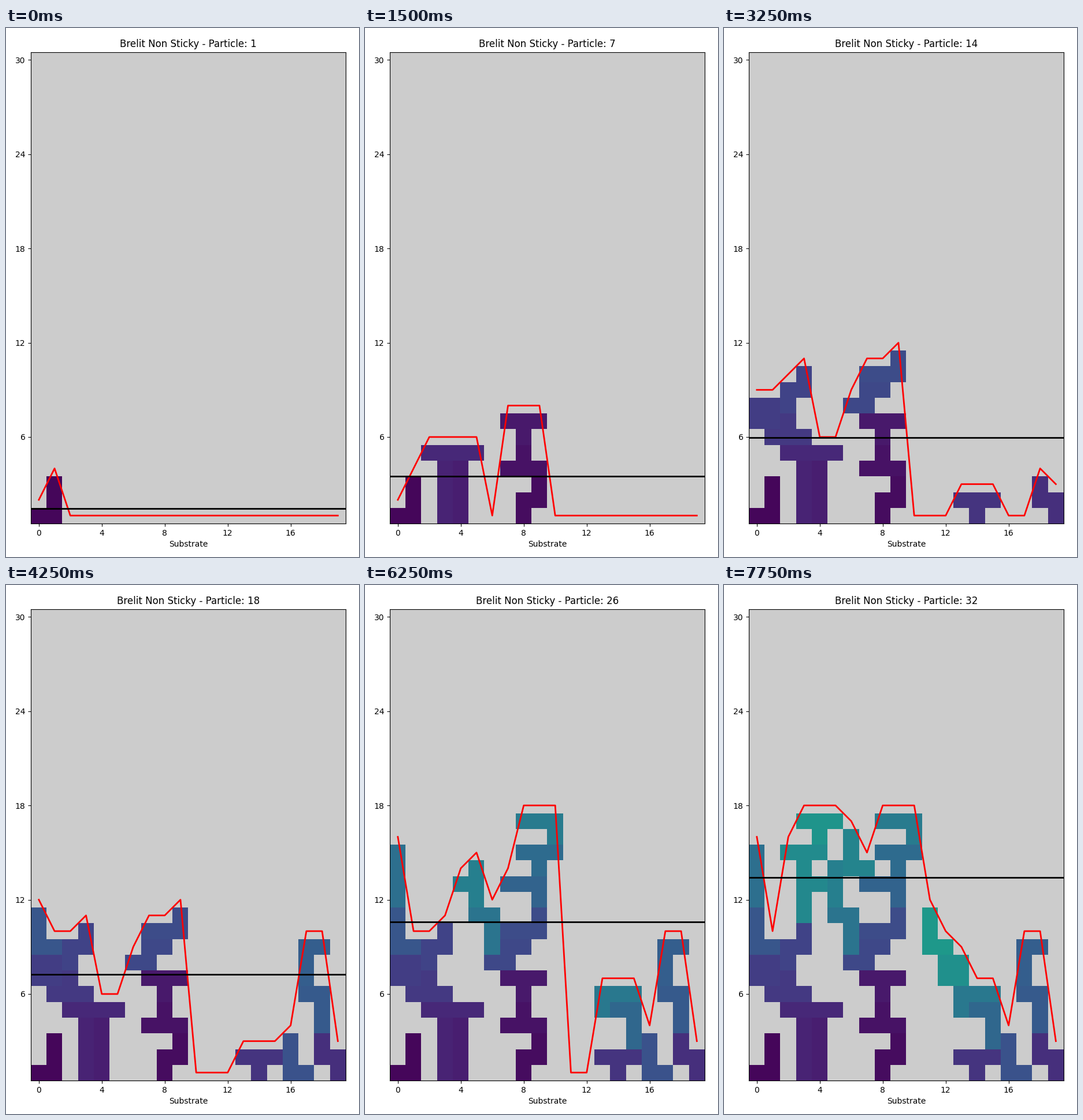
Write a matplotlib script that moves like this. It is 611x917 px and loops after 8000 ms.

```python
import numpy as np
import matplotlib.pyplot as plt
from matplotlib.animation import FuncAnimation

W, H, DPI = 611, 917, 100
COLS, ROWS = 20, 30
FRAMES, STEP_MS = 32, 250
COLOR_MAX = 60

plt.rcParams["font.family"] = "DejaVu Sans"

# Rows of each block, bottom row first.
SHAPES = {
    "O": "## ##",
    "I": "# # # #",
    "flatI": "####",
    "J": "## .# .#",
    "L": "## #. #.",
    "7": ".# .# ##",
    "F": "#. #. ##",
    "S": "##. .##",
    "tallS": "#. ## .#",
    "tallZ": ".# ## #.",
    "T": "### .#.",
    "downT": ".#. ###",
    "leftT": ".# ## .#",
    "flatL": "### ..#",
    "hookR": "..# ###",
    "hookL": "#.. ###",
}

# (shape, left column, bottom row) in order of landing; the last one
# only counts towards the mean height.
DROPS = [
    ("J", 0, 1), ("tallS", 8, 1), ("T", 7, 4), ("downT", 7, 6),
    ("I", 4, 1), ("I", 3, 1), ("flatI", 2, 5), ("tallZ", 18, 1),
    ("downT", 13, 1), ("T", 1, 6), ("O", 0, 7), ("tallS", 2, 8),
    ("S", 6, 8), ("flatL", 7, 10), ("L", 16, 1), ("L", 0, 9),
    ("7", 17, 4), ("F", 17, 7), ("hookR", 7, 12), ("7", 14, 3),
    ("downT", 8, 14), ("I", 0, 12), ("7", 5, 9), ("hookL", 13, 5),
    ("hookR", 8, 16), ("leftT", 4, 12), ("L", 6, 14), ("F", 3, 11),
    ("downT", 2, 14), ("O", 12, 7), ("downT", 3, 16), ("L", 11, 9),
    ("flatI", 11, 12),
]


def cells(shape, col, row):
    for dy, line in enumerate(SHAPES[shape].split()):
        for dx, mark in enumerate(line):
            if mark == "#":
                yield col + dx, row + dy


def stack(count):
    """Grid of particle numbers and the surface above each column."""
    grid = np.zeros((ROWS, COLS))
    surface = np.ones(COLS)
    for number, drop in enumerate(DROPS[:count], 1):
        for x, y in cells(*drop):
            grid[y - 1, x] = number
            surface[x] = max(surface[x], y + 1)
    return np.ma.masked_equal(grid, 0), surface


fig = plt.figure(figsize=(W / DPI, H / DPI), dpi=DPI, facecolor="white")
ax = fig.add_axes([43.2 / W, 58.2 / H, 544.8 / W, 817.2 / H])
ax.set_facecolor("0.8")

image = ax.imshow(stack(1)[0], cmap="viridis", vmin=0, vmax=COLOR_MAX,
                  origin="lower", interpolation="nearest", aspect="auto",
                  extent=(-0.5, COLS - 0.5, 0.5, ROWS + 0.5))
surface_line, = ax.plot(np.arange(COLS), np.ones(COLS), color="red", lw=2)
mean_line = ax.axhline(1, color="black", lw=2)

ax.set_xlim(-0.5, COLS - 0.5)
ax.set_ylim(0.5, ROWS + 0.5)
ax.set_xticks(range(0, COLS, 4))
ax.set_yticks(range(6, ROWS + 1, 6))
ax.set_xlabel("Substrate")
title = ax.set_title("")


def draw(frame):
    count = frame + 1
    grid, surface = stack(count)
    # The mean line runs one particle ahead of the picture.
    mean = stack(count + 1)[1].mean()
    image.set_data(grid)
    surface_line.set_ydata(surface)
    mean_line.set_ydata([mean, mean])
    title.set_text(f"Brelit Non Sticky - Particle: {count}")
    return image, surface_line, mean_line, title


anim = FuncAnimation(fig, draw, frames=FRAMES, interval=STEP_MS,
                     repeat=True, repeat_delay=0, blit=False)
plt.show()
```
